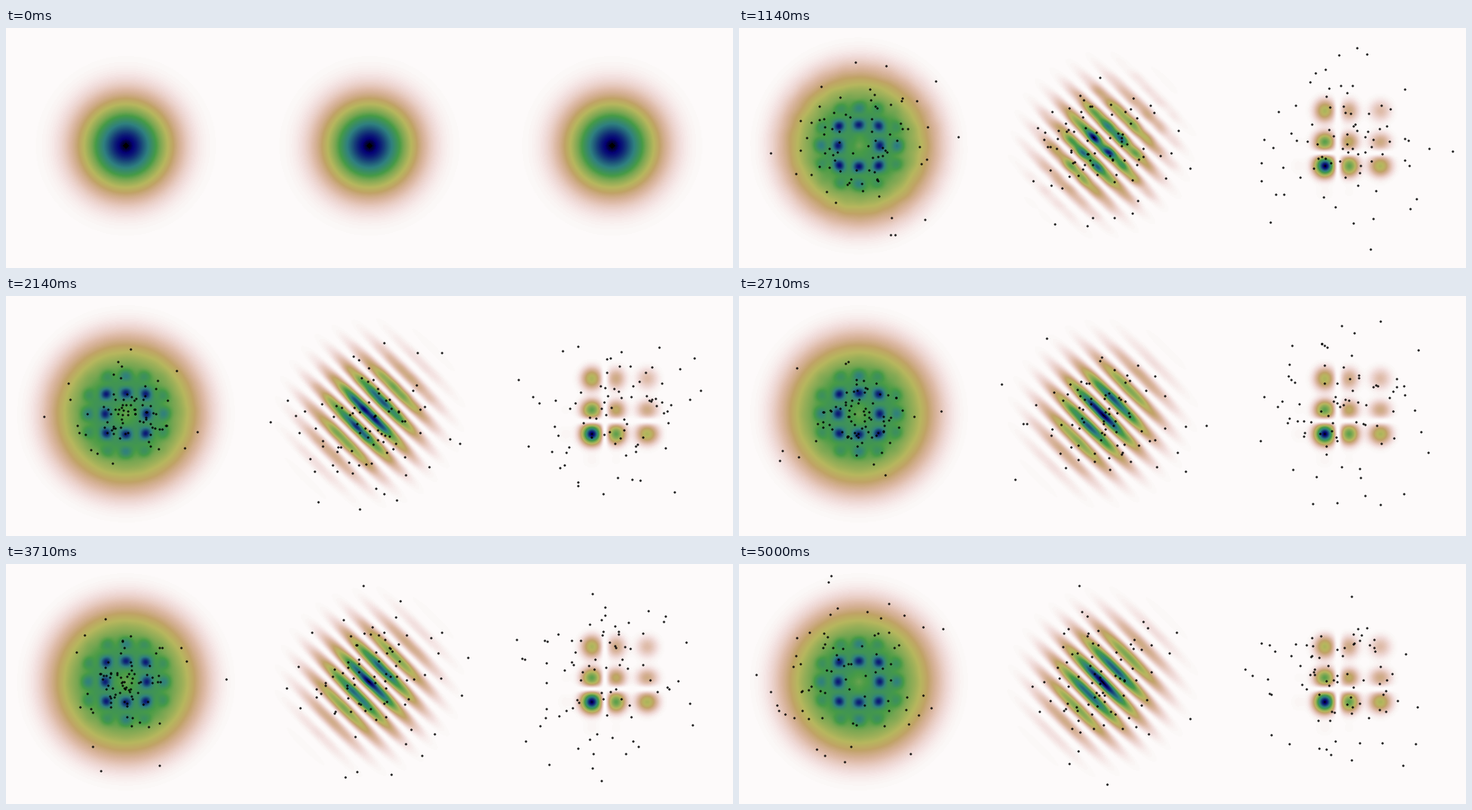
A matplotlib script that plays this animation: 806 px wide and 267 px high, repeating every 5140 ms.

```python
import numpy as np
import matplotlib.pyplot as plt
from matplotlib.animation import FuncAnimation

W, H, DPI = 806, 267, 64
LOOP, FRAMES = 5140, 36
CENTERS = [(133, 131), (403, 131), (672, 131)]
CELL = 22.3          # grid pitch of the left density
STRIPE = 20.5        # pitch of the diagonal stripes
POINTS = 85

px, py = np.meshgrid(np.arange(W) + 0.5, np.arange(H) + 0.5)


def bell(x, c, s):
    return np.exp(-0.5 * ((x - c) / s) ** 2)


def grid_density(x, y):
    r = np.hypot(x, y)
    plateau = 0.62 * np.exp(-(r / 75) ** 3.4)
    cells = (1 + np.cos(2 * np.pi * x / CELL)) * (1 + np.cos(2 * np.pi * y / CELL)) / 4
    ring = 0.35 * np.exp(-((r - 28) / 18) ** 2)
    return plateau + ring * cells - 0.17 * bell(r, 0, 8.5)


def stripe_density(x, y):
    across = (x - y) / np.sqrt(2)
    wave = (1 + np.cos(2 * np.pi * (across + 0.3) / STRIPE)) / 2
    return bell(np.hypot(x, y), 0, 32) * (0.02 + 0.98 * wave ** 1.1)


def modes(u):
    peaks = (bell(u, -22.5, 7) + 0.5 * bell(u, 4.5, 6.5)
             + 0.33 * bell(u, 39, 7.5) + 0.01 * bell(u, -52, 6))
    return peaks * (1 - np.exp(-((u + 8) / 4) ** 2))


def product_density(x, y):
    return modes(x) * modes(-y)


def ripple(rng, x, y):
    """Smooth random field with waves of about 20 pixels."""
    total = np.zeros_like(x)
    for _ in range(12):
        angle, phase = rng.uniform(0, 2 * np.pi, 2)
        k = 2 * np.pi / rng.uniform(14, 30)
        total += np.cos(k * (x * np.cos(angle) + y * np.sin(angle)) + phase)
    return total / np.sqrt(6)


DENSITIES = [grid_density, stripe_density, product_density]
LIMITS = [103, 80, 95]          # radius explored by the early estimates
NOISE = [0.12, 0.9, 0.15]


def estimate(step):
    """Density map after a number of sampling steps."""
    field = np.zeros((H, W))
    rng = np.random.default_rng(50 + step)
    for i, (cx, cy) in enumerate(CENTERS):
        cols = slice(W * i // 3, W * (i + 1) // 3)
        x, y = px[:, cols] - cx, py[:, cols] - cy
        r = np.hypot(x, y)
        prior = bell(r, 0, 30)
        if step == 0:
            field[:, cols] = prior
            continue
        blend = 1 - 0.2 ** step
        reach = LIMITS[i] * (1 + 0.02 * step ** 2)
        value = DENSITIES[i](x, y) * np.exp(-(r / reach) ** 8)
        value *= 1 + NOISE[i] / step ** 1.2 * ripple(rng, x, y)
        value /= max(1, value.max())
        field[:, cols] = blend * value + (1 - blend) * prior
    return np.clip(field, 0, 1)


def samples(step):
    if step == 0:
        return np.empty((0, 2))
    rng = np.random.default_rng(900 + step)
    left = np.interp(step, [3, 7, 13, 19, 25, 30], [38, 50, 23, 28, 32, 54])
    clouds = []
    for (cx, cy), spread in zip(CENTERS, (left, 41, 46)):
        offset = rng.standard_t(8, (POINTS, 2)) * spread * 0.92
        offset = offset[np.hypot(*offset.T) < 122]
        clouds.append(offset + (cx, cy))
    return np.vstack(clouds)


def step_at(frame):
    # every seventh frame holds the previous picture
    return frame - (frame + 4) // 7


steps = range(step_at(FRAMES - 1) + 1)
fields = [estimate(s) for s in steps]
clouds = [samples(s) for s in steps]

fig = plt.figure(figsize=(W / DPI, H / DPI), dpi=DPI)
ax = fig.add_axes([0, 0, 1, 1])
ax.set_axis_off()
image = ax.imshow(fields[0], cmap="gist_earth_r", vmin=0, vmax=1,
                  extent=(0, W, H, 0), aspect="auto", interpolation="nearest")
dots = ax.scatter([], [], s=(2.4 * 72 / DPI) ** 2, c="black", linewidths=0)
ax.set_xlim(0, W)
ax.set_ylim(H, 0)


def draw(frame):
    step = step_at(frame)
    image.set_data(fields[step])
    dots.set_offsets(clouds[step])
    return image, dots


anim = FuncAnimation(fig, draw, frames=FRAMES, interval=LOOP / FRAMES,
                     repeat=True, repeat_delay=0)
plt.show()
```
